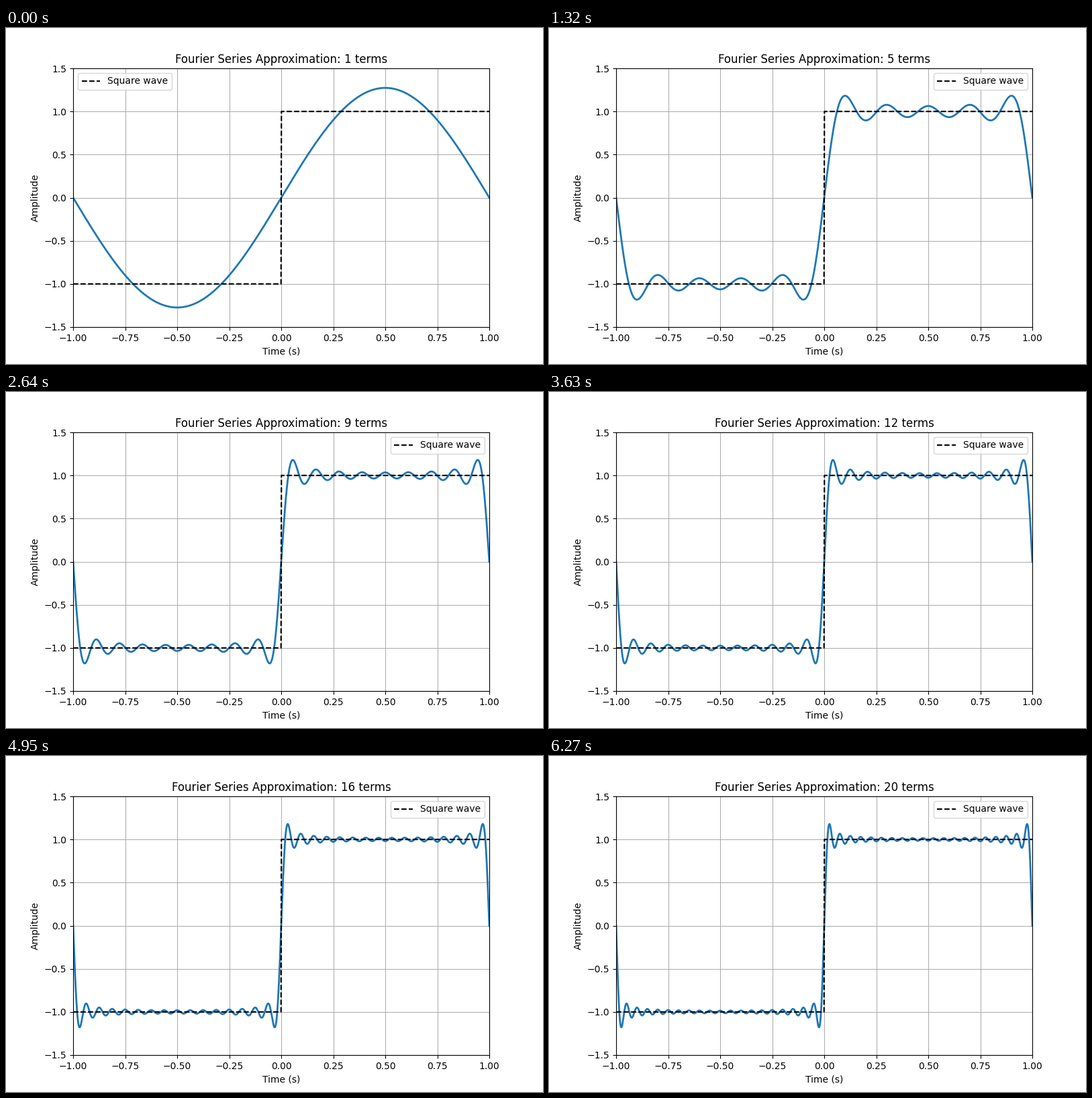
Animation, 800 px wide and 500 px high, one loop 6.6 s. Source, as a matplotlib script:

```python
import numpy as np
import matplotlib.pyplot as plt
from matplotlib.animation import FuncAnimation

TERMS = 20
STEP_MS = 330

t = np.linspace(-1, 1, 1000)


def partial_sum(n):
    """Sum of the first n odd harmonics of a unit square wave."""
    odd = 2 * np.arange(n)[:, None] + 1
    return 4 / np.pi * (np.sin(odd * np.pi * t) / odd).sum(axis=0)


fig, ax = plt.subplots(figsize=(8, 5), dpi=100)
curve, = ax.plot([], [], lw=2)
ax.plot(t, np.sign(np.sin(np.pi * t)), "k--", label="Square wave")
ax.set_xlim(-1, 1)
ax.set_ylim(-1.5, 1.5)
ax.set_xlabel("Time (s)")
ax.set_ylabel("Amplitude")
ax.grid(True)
ax.legend(loc="best")


def update(i):
    n = i + 1
    curve.set_data(t, partial_sum(n))
    ax.set_title(f"Fourier Series Approximation: {n} terms")
    return curve,


anim = FuncAnimation(fig, update, frames=TERMS, interval=STEP_MS,
                     init_func=lambda: update(0), repeat=True, repeat_delay=0)
plt.show()
```
